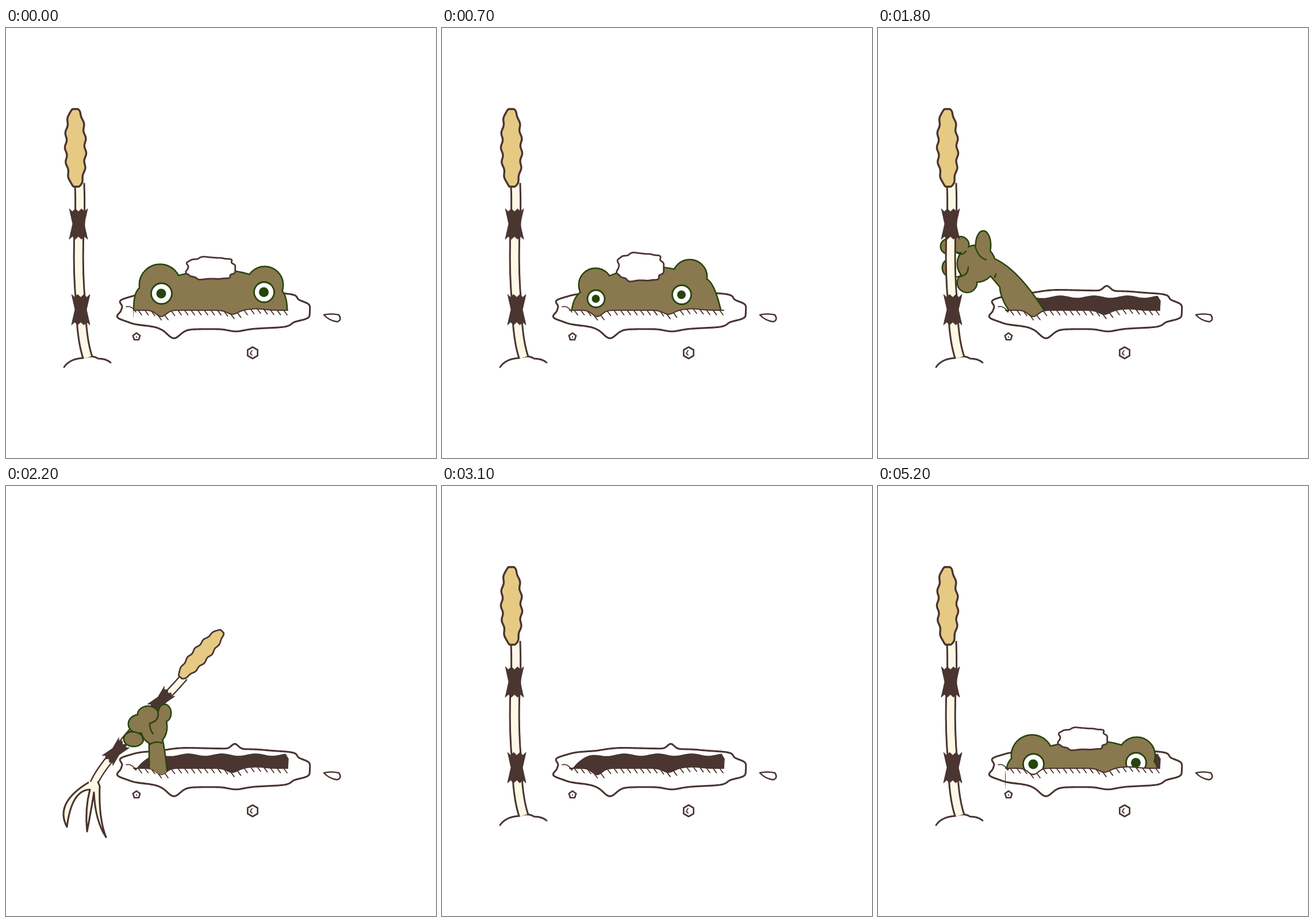
An HTML page with a canvas that plays this animation: 748 px wide and 748 px high, repeating every 5.3 s.

```html
<!DOCTYPE html>
<html lang="en">
<head>
<meta charset="utf-8">
<title>Frog in the snow</title>
<style>
  html, body { margin: 0; width: 100%; height: 100%; overflow: hidden; background: #fff; }
  canvas { display: block; }
</style>
</head>
<body>
<canvas id="stage" width="748" height="748"></canvas>
<script>
const ctx = document.getElementById('stage').getContext('2d');
const LINE = '#4a3531', GREEN = '#24450c', SKIN = '#8a784e', CORN = '#e6ca84', CREAM = '#fdf8e6';
const PIVOT = [265, 500], TAU = Math.PI * 2;

const mix = (a, b, t) => a.map((v, i) => v + (b[i] - v) * t);
const span = (v, from, to) => Math.max(0, Math.min(1, (v - from) / (to - from)));
const bell = (x, centre, width) => Math.exp(-(((x - centre) / width) ** 2));
const svg = d => new Path2D(d);

// Points [f(v)] for v running from a to b
function trace(a, b, step, f) {
  const n = Math.round(Math.abs(b - a) / step);
  return Array.from({ length: n + 1 }, (_, i) => f(a + (b - a) * i / n));
}

function poly(points, closed = true) {
  const path = new Path2D();
  points.forEach(p => path.lineTo(...p));
  if (closed) path.closePath();
  return path;
}

// Smooth open line through the points
function curve(points) {
  const path = new Path2D(), at = i => points[Math.max(0, Math.min(points.length - 1, i))];
  path.moveTo(...at(0));
  for (let i = 0; i < points.length - 1; i++) {
    const [a, b, c, d] = [at(i - 1), at(i), at(i + 1), at(i + 2)];
    path.bezierCurveTo(b[0] + (c[0] - a[0]) / 6, b[1] + (c[1] - a[1]) / 6,
      c[0] - (d[0] - b[0]) / 6, c[1] - (d[1] - b[1]) / 6, c[0], c[1]);
  }
  return path;
}

function oval(x, y, rx, ry = rx) {
  const path = new Path2D();
  path.ellipse(x, y, rx, ry, 0, 0, TAU);
  return path;
}

// Squarish lump with an uneven edge
function lump(x, y, rx, ry, rough) {
  const bend = v => Math.sign(v) * Math.abs(v) ** .72;
  return trace(0, TAU, TAU / 360, a => {
    const r = 1 + rough * (Math.sin(7 * a + 1) + .6 * Math.sin(12 * a + 4));
    return [x + rx * r * bend(Math.cos(a)), y + ry * r * bend(Math.sin(a))];
  });
}

const ngon = (x, y, r, n) => poly(trace(0, n - 1, 1, i =>
  [x + r * Math.sin(i * TAU / n), y - r * Math.cos(i * TAU / n)]));

function paint(path, fill, stroke = LINE, width = 3.1) {
  if (fill) { ctx.fillStyle = fill; ctx.fill(path); }
  if (stroke) { ctx.strokeStyle = stroke; ctx.lineWidth = width; ctx.stroke(path); }
}

// Several shapes inside one common outline
function fuse(paths) {
  paths.forEach(p => paint(p, null, GREEN, 5));
  paths.forEach(p => paint(p, SKIN, null));
}

function group(draw) { ctx.save(); draw(); ctx.restore(); }

// Ground
const lipY = x => 491 + 11 * bell(x, 270, 12) + 7 * bell(x, 394, 13) - 2.5 * bell(x, 435, 20);
const backY = x => 468 - 2 * Math.cos((x - 317) / 58.5 * TAU) + 24 * Math.exp((226 - x) / 16);
const lipPoints = trace(490, 222, 3, x => [x, lipY(x)]);
const lip = poly(lipPoints, false);
const hole = poly([...trace(226, 486, 3, x => [x, backY(x)]), [491, 475], ...lipPoints]);
// Everything that sits in the hole is cut off at its front edge.
const visible = poly([[0, 0], [494, 0], [494, 491], ...lipPoints, [222, 748], [0, 748]]);
const rim = poly(lump(361, 490.5, 166, 34, .025).map(([x, y]) =>
  [x, y < 490 ? y - 9 * bell(x, 398, 8) : y + 15 * bell(x, 292, 15) + 4 * bell(x, 400, 18)]));
const hatches = poly([], false);
for (let x = 230; x < 488; x += 11.5) {
  hatches.moveTo(x, lipY(x));
  hatches.lineTo(x + 6, lipY(x) + 8);
}
const stones = [ngon(227, 537, 6.5, 5), ngon(429, 565, 10, 6),
  svg('M553 499Q566 496 579 499Q585 508 576 511Q562 509 553 499Z')];
const marks = svg('M227 537v1M428 561l-3 5 3 3M209 485Q218 482 226 494');
const mound = svg('M101 590Q110 576 133 574Q150 568 160 575Q174 575 182 582');

// Spear, standing upright with its top at 120, 142
const shaft = svg('M128 270Q130 320 126.500 370Q125 430 130 480Q131 540 142 573');
const cornEdge = side => y => {
  const t = (y - 140) / 137, swell = Math.sin(Math.PI * t) ** .34;
  const ripple = Math.cos((y - (side > 0 ? 192 : 208)) / 26 * TAU);
  return [120 + 2 * t + side * (17 * swell + 1.6 * ripple * swell), y];
};
const corn = poly([...trace(141, 276, 2, cornEdge(1)), ...trace(276, 141, 2, cornEdge(-1))]);
const band = (x, y) => poly([-1, 1].flatMap(side => [
  ...trace(16 * side, -16 * side, 16 / 3, v => [x + v, y + side * (24 + 2.5 * Math.cos(v * 3 * Math.PI / 16 + Math.PI))]),
  [x - 10 * side, y]]));
const bands = [band(126, 341), band(130, 490)];
const fork = svg(`M143 516Q84 552 106 593Q114 529 146 528Q137 562 141 601
  Q149 559 153 533Q155 582 174 611Q161 578 163 522L160 515`);

function drawSpear(lifted) {
  ctx.lineCap = 'butt';
  paint(shaft, null, LINE, 19);
  paint(shaft, null, CREAM, 13);
  ctx.lineCap = 'round';
  if (lifted) group(() => {
    ctx.translate(120, 142);
    ctx.scale(1.25, 1.25);
    ctx.rotate(-43 * Math.PI / 180);
    ctx.translate(-375, -253);
    paint(fork, CREAM);
  });
  paint(corn, CORN, LINE, 3.4);
  bands.forEach(b => paint(b, LINE, LINE, 1));
}

// Arms: open hand reaching out, and fist around the spear
const reach = {
  parts: [svg('M196 400Q240 415 290 495L312 560 262 570 240 505Q214 475 213 450L196 430Z'),
    oval(122, 380, 12), oval(123, 417, 10, 13), oval(143, 377, 14, 13), oval(155, 443, 16),
    oval(171, 410, 32, 31), oval(183, 378, 12, 24)],
  folds: svg('M136 390Q147 398 153 388M137 433Q157 432 157 416M169 380Q175 400 188 403M203 434l2-6')
};
const grip = {
  parts: [svg('M251 545L250 440 271 440Q279 480 283 545Z'), oval(257, 419, 22, 29), oval(276, 395, 10, 14),
    oval(231, 414, 17, 15), oval(222, 440, 16, 12), oval(247, 398, 17, 14)],
  folds: svg('M264 392Q268 408 250 413Q250 425 256 431M214 427Q238 428 238 440M249 450Q260 443 271 447')
};

function drawArm({ parts, folds }) {
  fuse(parts);
  paint(folds, null, GREEN, 2.4);
}

// Frog's head: facing forward, and turned to the left
const forward = {
  body: [[225, 520], [231, 455], [303, 431], [365, 422], [424, 430], [481, 460], [488, 520]],
  bumps: [[268, 447, 35], [450, 447, 31]],
  eyes: [[270.5, 462, 18, 8.5], [449, 459.5, 17.5, 8.5]],
  clump: [356, 418, 42, 19]
};
const turned = {
  body: [[225, 520], [236, 466], [300, 429], [360, 418], [405, 421], [465, 442], [491, 520]],
  bumps: [[267, 447, 28], [431, 433, 29]],
  eyes: [[268, 471, 15, 7], [417, 464, 16.5, 7.5]],
  clump: [345, 416, 40, 24]
};

function drawHead(turn, drop, clumpDrop) {
  const blend = part => forward[part].map((p, i) => mix(p, turned[part][i], turn));
  ctx.translate(0, drop);
  fuse([curve(blend('body')), ...blend('bumps').map(b => oval(...b))]);
  for (const [x, y, r, pupil] of blend('eyes')) {
    paint(oval(x, y, r), '#fff', GREEN, 2.8);
    paint(oval(x - .5, y, pupil), GREEN, null);
  }
  ctx.translate(0, clumpDrop - drop);
  paint(poly(lump(...mix(forward.clump, turned.clump, turn), .045)), '#fff', LINE, 2.8);
}

function pose(dx, dy, degrees) {
  ctx.translate(PIVOT[0] + dx, PIVOT[1] + dy);
  ctx.rotate(degrees * Math.PI / 180);
  ctx.translate(-PIVOT[0], -PIVOT[1]);
}

// One step is 100 ms.
function draw(step) {
  ctx.fillStyle = '#fff';
  ctx.fillRect(0, 0, 748, 748);
  ctx.lineJoin = ctx.lineCap = 'round';
  const rising = step > 31, peeking = step < 13 || rising;
  const standing = step < 20 || step > 30, tug = step === 19 ? -13 : 0;

  paint(rim, '#fff');
  if (step > 11) paint(hole, LINE, LINE, 1.5);
  group(() => {
    ctx.clip(visible);
    if (peeking) {
      const turn = span(step, 2, 4) - span(step, 8, 10), rise = 22 * (34 - step);
      drawHead(turn, rising ? rise : 16 * Math.max(0, step - 10) ** 1.4,
        rising ? rise : 28 * Math.max(0, step - 11));
    } else if (step > 13 && step < 20) {
      pose(0, 95 * (1 - span(step, 14, 16)) + tug, 45 * (1 - span(step, 14, 18)));
      drawArm(reach);
    }
  });
  paint(lip, null, LINE, 2);
  paint(hatches, null, LINE, 1.8);
  stones.forEach(s => paint(s, '#fff', LINE, 2.6));
  paint(marks, null, LINE, 1.8);

  if (standing) {
    paint(mound, null, LINE, 2.8);
    group(() => {
      ctx.translate(0, tug);
      drawSpear(false);
    });
  } else if (step < 30) group(() => {
    const lean = 1 - span(step, 20, 22), lower = span(step, 22, 24), drag = span(step, 24, 29);
    ctx.clip(visible);
    pose(-30 * lean - 26 * lower + 196 * drag ** 2, -10 * lean + 41 * lower + 35 * drag, 42 * drag - 25 * lean);
    group(() => {
      ctx.translate(375, 253);
      ctx.rotate(43 * Math.PI / 180);
      ctx.scale(.8, .8);
      ctx.translate(-120, -142);
      drawSpear(true);
    });
    drawArm(grip);
  });
}

const start = performance.now();
function tick() {
  const t = (performance.now() - start) % 5300;
  draw(t < 5100 ? Math.min(31, Math.floor(t / 100)) : 32 + Math.floor((t - 5100) / 100));
  requestAnimationFrame(tick);
}
tick();
</script>
</body>
</html>
```
